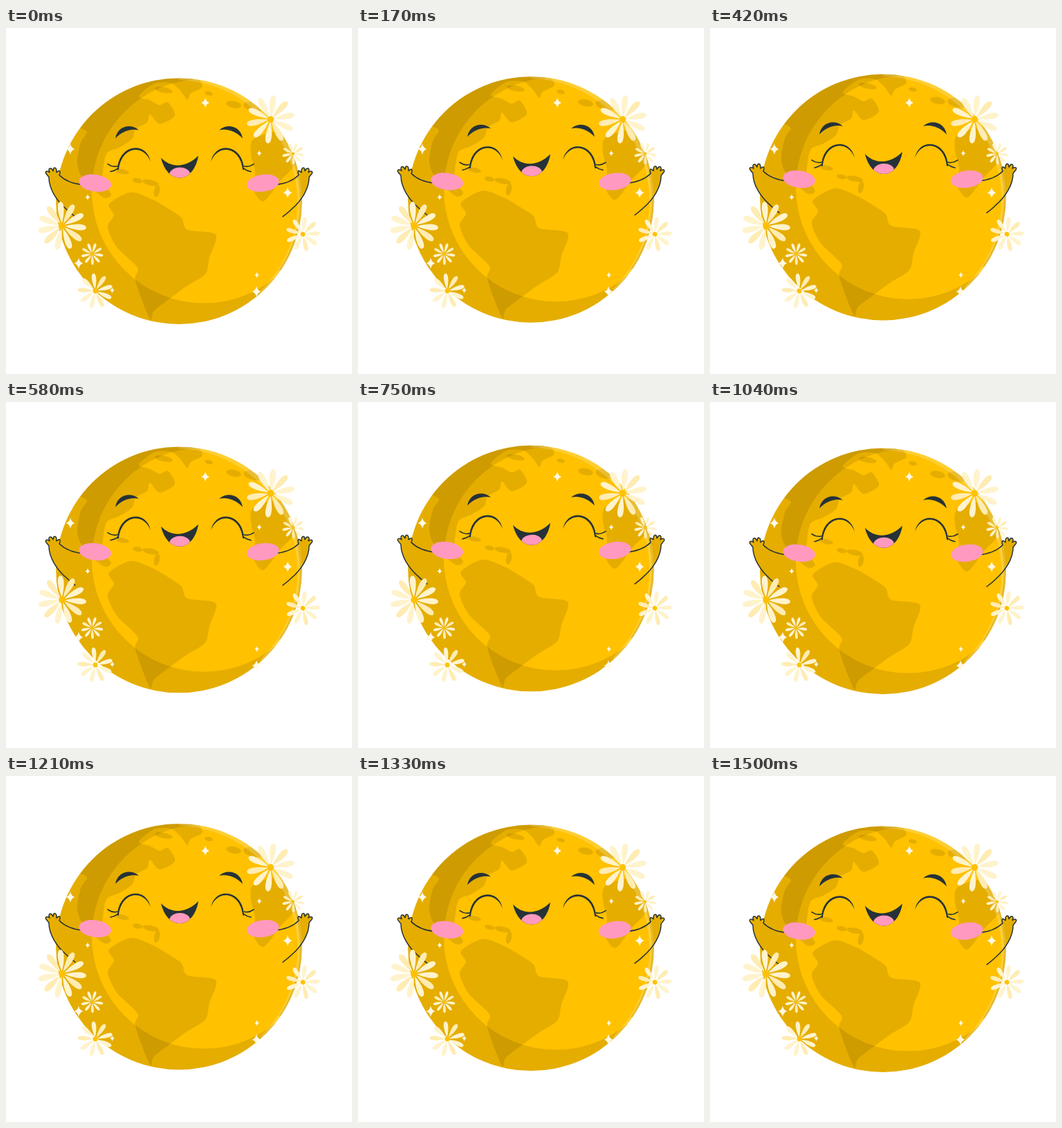
An HTML page with a canvas for the animation above (1540 ms loop, 500 by 500 pixels).

```html
<!DOCTYPE html>
<html lang="en">
<head>
<meta charset="utf-8">
<title>Happy globe</title>
<style>
  html, body { margin: 0; width: 100%; height: 100%; overflow: hidden; background: #fff; }
  canvas { display: block; width: 500px; height: 500px; }
</style>
</head>
<body>
<canvas id="stage"></canvas>
<script>
const LOOP = 1540, CYCLE = 1500, RISE = 10, LEAD = 12, BASE = 0.7;
const GOLD = '#ffc100', ARM = '#e6ae00', INK = '#263238', PINK = '#ff99bf';
const CREAM = '#fff3cc', BUTTER = '#ffecb3', SPARK = '#fff9e6';
const SHADE = 'rgba(0,0,0,.1)', SHINE = 'rgba(255,255,255,.2)';
const CX = 250, CY = 249.7, R = 177.8;

const canvas = document.getElementById('stage');
const ctx = canvas.getContext('2d');
const ratio = window.devicePixelRatio || 1;
canvas.width = canvas.height = 500 * ratio;

// Closed smooth outline through "x,y x,y ..." points, listed clockwise.
function outline(text) {
  const pts = text.trim().split(/\s+/).map(p => p.split(',').map(Number));
  const n = pts.length, path = new Path2D(), pull = 1 / 7;
  path.moveTo(...pts[0]);
  pts.forEach((b, i) => {
    const a = pts[(i + n - 1) % n], c = pts[(i + 1) % n], d = pts[(i + 2) % n];
    path.bezierCurveTo(
      b[0] + (c[0] - a[0]) * pull, b[1] + (c[1] - a[1]) * pull,
      c[0] - (d[0] - b[0]) * pull, c[1] - (d[1] - b[1]) * pull, c[0], c[1]);
  });
  return path;
}

function oval(x, y, rx, ry = rx, tilt = 0) {
  const path = new Path2D();
  path.ellipse(x, y, rx, ry, tilt, 0, 2 * Math.PI);
  return path;
}

// Everything but a circle; fill with the even-odd rule.
function outside(x, y, r) {
  const path = new Path2D();
  path.rect(0, 0, 500, 500);
  path.addPath(oval(x, y, r));
  return path;
}

const globe = oval(CX, CY, R);
const shadow = outside(286, 235, 162);
const shine = outside(CX - 6.5, CY + 2.5, R);
const rim = outside(CX - 3, CY, R);

const north = outline(`105,140 120,108 190,66 268,70 284,84 267,94 262,103 252,90 238,79
  214,80 192,98 208,104 222,111 234,107 244,126 222,138 208,124 204,136 188,145 182,160
  164,172 146,180 141,200 140,222 152,240 140,244 112,218 103,195 108,165 117,150 106,143`);
const south = outline(`149,254 180,237 211,247 237,262 254,274 262,291 303,298 294,331
  288,355 262,372 240,388 214,408 208,420 187,365 190,346 160,316 147,287 156,270`);
const east = outline('358,160 400,150 420,190 395,222 372,250 357,232 360,208 354,182');
const islands = [
  [228, 89, 13, 4], [293, 94, 6, 3], [168, 207, 10, 3.5], [190, 220, 7, 3.5],
  [209, 223, 12, 4], [218, 235, 4, 9], [329, 110, 11, 5], [358, 113, 15, 7]
].map(([x, y, rx, ry]) => oval(x, y, rx, ry, 0.2));

const land = new Path2D();
[north, south, east, ...islands].forEach(part => land.addPath(part));

const brow = new Path2D('M158 159C161 142 179 136 192 147C180 144 167 149 158 159Z');
const eye = new Path2D('M161 205C162 167 203 162 209 193C200 167 167 169 163 204Z');
const lashes = new Path2D('M147 196Q154 201 161 199M151 207Q157 206 162 202');
const mouth = new Path2D(
  'M224 187C238 202 260 202 278 184C275 203 264 216 251 216C238 216 228 204 224 187Z');
const tongue = oval(251, 211, 15, 10, -0.05);
const cheek = oval(128.7, 223.6, 23.5, 12.3, 0.14);
const arm = new Path2D(
  'M112 226C98 225 86 221 77 212C79 208 78 205 76 206L73 208' +
  'C74 203 71 200 69 202L68 206C66 201 62 201 62 205L63 208' +
  'C59 205 56 207 58 210L62 215C62 232 73 249 88 262C92 266 96 269 100 272');

function fill(path, color, rule = 'nonzero') {
  ctx.fillStyle = color;
  ctx.fill(path, rule);
}

function stroke(path, width) {
  ctx.strokeStyle = INK;
  ctx.lineWidth = width;
  ctx.lineJoin = ctx.lineCap = 'round';
  ctx.stroke(path);
}

function scoped(draw) {
  ctx.save();
  draw();
  ctx.restore();
}

function mirrored(axis, draw) {
  draw();
  scoped(() => {
    ctx.translate(axis * 2, 0);
    ctx.scale(-1, 1);
    draw();
  });
}

function fillWithin(x, y, w, h, path, color) {
  scoped(() => {
    ctx.beginPath();
    ctx.rect(x, y, w, h);
    ctx.clip();
    fill(path, color, 'evenodd');
  });
}

function drawGlobe() {
  mirrored(CX, () => fill(arm, ARM));
  fill(globe, GOLD);
  scoped(() => {
    ctx.clip(globe);
    fill(land, SHADE);
    fill(shadow, SHADE, 'evenodd');
    fillWithin(CX, 60, 200, 320, shine, SHINE);
    fillWithin(CX, 185, 200, 165, rim, SHADE);
  });
}

function drawFace() {
  mirrored(CX, () => {
    stroke(arm, 1.5);
    fill(cheek, PINK);
    fill(brow, INK);
  });
  mirrored(252.5, () => {
    fill(eye, INK);
    stroke(lashes, 1.6);
  });
  fill(mouth, INK);
  scoped(() => {
    ctx.clip(mouth);
    fill(tongue, PINK);
  });
}

// A petal of length 1 along the x axis.
const petal = new Path2D('M.1 0C.5 -.14 .98 -.19 1 0C.98 .19 .5 .14 .1 0Z');

function drawFlower([x, y, size, petals, start]) {
  scoped(() => {
    ctx.translate(x, y);
    ctx.scale(size, size);
    ctx.rotate(start * Math.PI / 180);
    for (let i = 0; i < petals; i++) {
      fill(petal, i % 3 === 1 ? BUTTER : CREAM);
      ctx.rotate(2 * Math.PI / petals);
    }
    fill(oval(0, 0, 0.135), GOLD);
  });
}

// A four-pointed star of radius 1.
const star = new Path2D('M0 -1Q.16 -.16 .82 0Q.16 .16 0 1Q-.16 .16 -.82 0Q-.16 -.16 0 -1Z');

function drawSparkle([x, y, size]) {
  scoped(() => {
    ctx.translate(x, y);
    ctx.scale(size, size);
    fill(star, SPARK);
  });
}

// x, y, radius, petal count, angle of the first petal
const flowers = [
  [382.5, 132, 35, 10, -83], [81, 286, 35, 11, -94], [415, 181.5, 16, 9, -72],
  [429, 298, 25, 9, -83], [124.5, 326.5, 16, 9, -72], [129, 380, 25.5, 9, -96]
];

// x, y, radius
const sparkles = [
  [288, 108, 7.5], [93, 175, 8], [407, 238, 8], [366, 181, 4.5], [118, 244.5, 4.5],
  [105, 340, 8], [153.5, 379, 4.5], [362.5, 357, 4.5], [362, 381, 8]
];

function lift(time) {
  const phase = (time + LEAD) / CYCLE % 1;
  return RISE * (1 - Math.abs(1 - 2 * phase));
}

function frame(now) {
  ctx.setTransform(ratio, 0, 0, ratio, 0, 0);
  ctx.fillStyle = '#fff';
  ctx.fillRect(0, 0, 500, 500);
  scoped(() => {
    ctx.translate(0, BASE - lift(now % LOOP));
    drawGlobe();
    drawFace();
  });
  flowers.forEach(drawFlower);
  sparkles.forEach(drawSparkle);
  requestAnimationFrame(frame);
}
frame(0);
</script>
</body>
</html>
```
